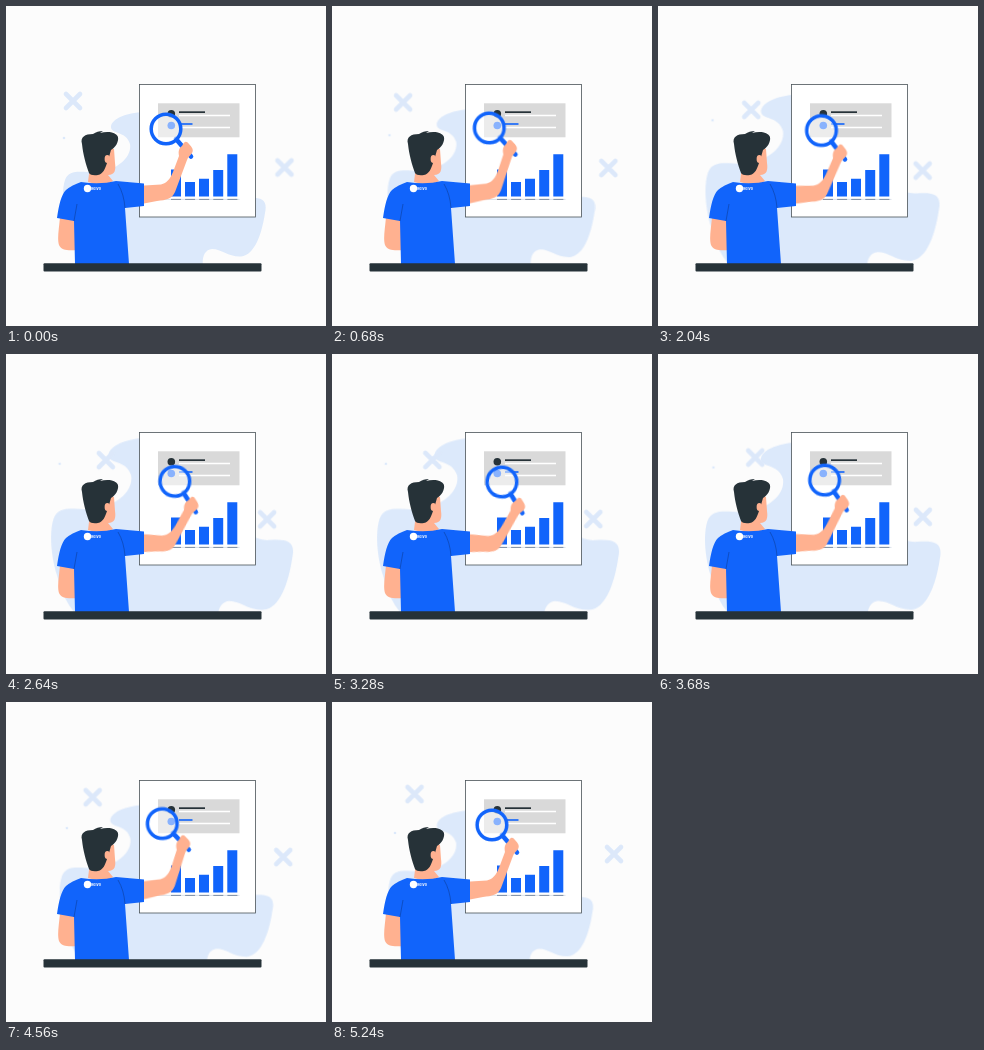
Recreate the animation shown at these times as an HTML page. Size 320 by 320 pixels, loop 5280 ms.

```html
<!DOCTYPE html>
<html lang="en">
<head>
<meta charset="utf-8">
<title>Report review</title>
<style>
  html, body { margin: 0; width: 100%; height: 100%; overflow: hidden; background: #fcfcfc; }
  svg { display: block; width: 100vw; height: 100vh; }

  .blue { fill: #1164fb; }
  .dark { fill: #263238; }
  .skin { fill: #ffb190; }
  .pale { fill: #dce9fb; }
  .cross { fill: none; stroke: #dce8fa; stroke-width: 4.6; stroke-linecap: round; }
  .seam { fill: none; stroke: #0d3f9c; stroke-width: .6; }

  .drift, .blob, .arm {
    animation: drift 5280ms cubic-bezier(.37, 0, .63, 1) infinite;
    transform-box: view-box;
  }
  .left  { --a: translate(67px, 95px); --b: translate(101px, 106.5px); --c: translate(82.5px, 92px); }
  .right { --a: translate(278.5px, 161.5px); --b: translate(260.5px, 165.5px); --c: translate(282px, 152px); }
  .speck { --a: translate(58px, 132px); --b: translate(53.5px, 109px); --c: translate(63px, 131px); }
  .blob  {
    transform-origin: 118px 223px;
    --a: scale(1);
    --b: scale(1.2);
    --c: translateY(3.5px) scale(1.01);
  }
  .arm { transform-origin: 133px 189px; animation-name: swing; }

  @keyframes drift {
    0% { transform: var(--a); }
    56.8% { transform: var(--b); }
    100% { transform: var(--c); }
  }
  @keyframes swing {
    0%, 100% { transform: rotate(0deg); }
    18.9% { transform: rotate(-3deg); }
    58.7% { transform: rotate(9.3deg); }
    90.9% { transform: rotate(-3.8deg); }
  }
</style>
</head>
<body>
<svg viewBox="0 0 320 320">
  <defs>
    <clipPath id="floor"><path d="M0 0H320V258H0Z"/></clipPath>
    <path id="x" d="M-7-7L7 7M7-7L-7 7"/>
  </defs>

  <!-- Backdrop -->
  <g clip-path="url(#floor)">
    <path class="blob pale" d="M150 106C132 105 108 109 105 120C104 129 120 124 124 138C126 151 112 163 94 166
      C80 168 64 161 59 174C55 186 57 207 62 222C66 240 75 255 92 268H198C195 254 197 244 206 243
      C216 243 222 251 235 250.500C249 249 256 227 259 207C262 193 255 191 240 192C215 194 205 160 190 130C180 112 165 107 150 106Z"/>
  </g>
  <g class="drift left"><use href="#x" class="cross"/></g>
  <g class="drift right"><use href="#x" class="cross"/></g>
  <g class="drift speck"><circle class="pale" r="1.3"/></g>

  <!-- Report -->
  <rect x="133.500" y="78.500" width="116" height="132.500" fill="#fff" stroke="#4a5358" stroke-width=".8"/>
  <rect x="152" y="97.300" width="81.500" height="34" fill="#d9d9d9"/>
  <circle class="dark" cx="165.300" cy="107.800" r="3.800"/>
  <circle class="blue" cx="165.300" cy="119.500" r="3.800"/>
  <path class="dark" d="M173 105.300h26v1.700h-26z"/>
  <path class="blue" d="M173 117.200h13.500v1.600h-13.500z"/>
  <path d="M173 109.500h51M173 121.500h51" stroke="#fff" stroke-width="1.700"/>
  <path class="blue" d="M165 163.500h10v27h-10zM179 176h10v14.500h-10zM193 172.700h10v17.800h-10zM207.200 164h10v26.500h-10zM221.300 148.200h10v42.300h-10z"/>
  <path d="M152 193.400h81.500" stroke="#dce2ea" stroke-width="1"/>
  <path d="M165 193.400h68" stroke="#7d8da3" stroke-width="1" stroke-dasharray="10 4.100"/>

  <!-- Resting arm, neck and face -->
  <path class="skin" d="M54 211C53 223 51 233 53 239C55 244 62 245 71 244V211Z"/>
  <path class="skin" d="M84 160L82 176Q97 181 107 175L102 169C109 169 110 164 109 157L108 143L98 138Z"/>

  <!-- Raised arm with lens -->
  <g class="arm">
    <path d="M170 133L185 150.500" stroke="#1164fb" stroke-width="4.600" stroke-linecap="round"/>
    <path class="skin" d="M130 180L155 178.500C161 177 164 173 167 166L173 150C172 145 173 142 176 140
      C178 136 180 134 183 138C186 141 188 144 186 147C184 150 182 151 181 154L169 186C166 193 160 194 151 195L130 199Z"/>
    <circle cx="160" cy="123" r="14.800" fill="#fff" fill-opacity=".5" stroke="#1164fb" stroke-width="3.500"/>
  </g>

  <!-- Shirt -->
  <path class="blue" d="M75 176Q94 179 110 175L138 177.500V200L119 202L123 258H69L68 215L51 212C53 199 55 189 60 184Q66 179 75 176Z"/>
  <path class="seam" d="M68 215L71 198M119 202Q118 188 112 178"/>
  <circle cx="81.500" cy="182.500" r="3.700" fill="#fff"/>
  <text x="85.300" y="184.200" font-family="Inter, Arial, sans-serif" font-size="3.700" font-weight="700" fill="#fff">kelvo</text>

  <!-- Hair and ear -->
  <path class="dark" d="M76 138C74 131 79 128 87 128C90 126 93 125 97 125L94 127C102 125 110 126 112 131
    C113 136 109 142 105 144L103 151L101 157C99 163 97 168 92 169Q85 170 83 167C80 159 77 148 76 138Z"/>
  <ellipse class="skin" cx="101.300" cy="153" rx="2.700" ry="3.900"/>

  <rect class="dark" x="37.500" y="257.300" width="218" height="8.200" rx="1"/>
</svg>
</body>
</html>
```
